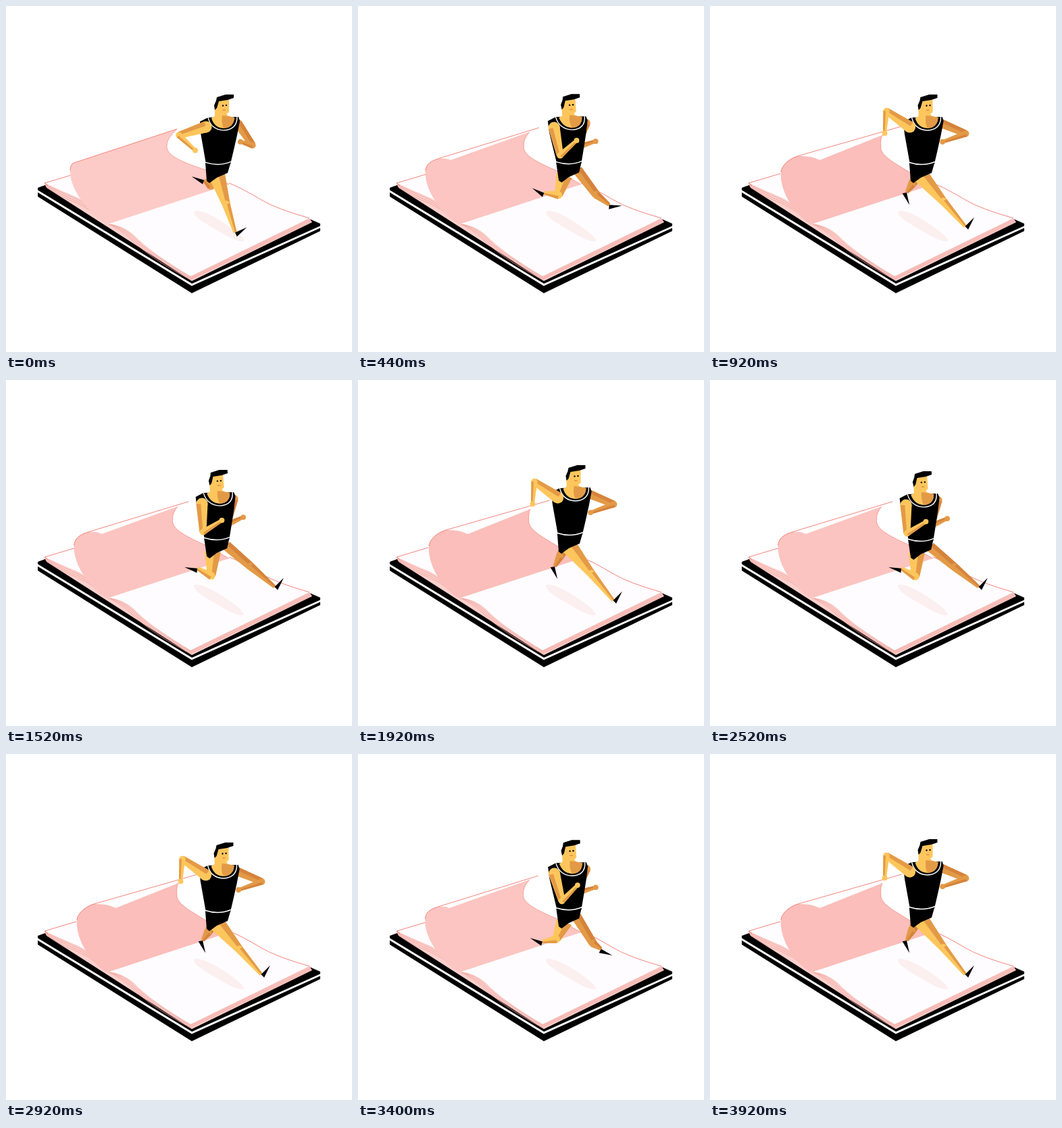
Animation of 512 by 512 pixels, one loop 3.96 s. Source, as an HTML page with a canvas:

```html
<!DOCTYPE html>
<html lang="en">
<head>
<meta charset="utf-8">
<title>Runner on a book</title>
<style>
html, body { margin: 0; width: 100%; height: 100%; overflow: hidden; background: #fff; }
canvas { display: block; width: 512px; height: 512px; }
</style>
</head>
<body>
<canvas id="stage" width="512" height="512"></canvas>
<script>
const ctx = document.getElementById('stage').getContext('2d');
const LOOP = 3960, STRIDE = 1000, TAU = Math.PI * 2;
const STANCE = .4, STRIKE = .92; // share of a stride on the ground, moment the near heel lands
const LIGHT = '#fdc65c', DARK = '#e39a47', DEEP = '#d5833c';
const PAPER = '#fefcff', PINK = '#fcd0cc', LINE = '#f0a19b', EDGE = '#f2766c';

const wrap = v => v - Math.floor(v);
const mix = (a, b, k) => a + (b - a) * k;
const mid = (a, b) => [mix(a[0], b[0], .5), mix(a[1], b[1], .5)];
const polar = ([x, y], deg, len) => {
  const a = deg * TAU / 360;
  return [x + Math.cos(a) * len, y + Math.sin(a) * len];
};

function fill(shape, color) {
  ctx.fillStyle = color;
  ctx.fill(new Path2D(shape));
}
function line(shape, color, width = 1) {
  ctx.strokeStyle = color;
  ctx.lineWidth = width;
  ctx.stroke(new Path2D(shape));
}
const poly = (pts, color) => fill('M' + pts.join('L') + 'Z', color);
function dot([x, y], r, color) {
  ctx.fillStyle = color;
  ctx.beginPath();
  ctx.arc(x, y, r, 0, TAU);
  ctx.fill();
}

function drawBook() {
  fill('M47 269L58 265L275 400L449 315L465 322V333L275 425L47 282Z', '#000');
  line('M46 273.500L275 412.500L466 326.500', '#fff', 3);
  fill('M57 262Q78 272 100 281Q128 292 150 322Q172 324 188 338Q215 366 273 400L449 314L453 320L275 407L60 269Z', PINK);
  for (let i = 0; i < 4; i++) {
    const k = i * 1.7;
    line(`M${57 + k / 3} ${262 + k}Q${79 - k} ${272 + k} ${101 - k * 2} ${281 + k}Q${128 - k} ${292 + k} 150 322` +
      `Q${172 - k} ${324 + k} ${188 - k} ${338 + k}Q${215 - k} ${366 + k} 273 ${400 + k}L${449 + k / 2} ${314 + k}`, LINE, .8);
  }
  fill('M57 262L115 244L330 263L150 323Q128 292 100 281Q78 272 57 262Z', PAPER);
  fill('M150 322L330 262Q348 269 378 287Q400 300 449 314L273 400Q215 366 188 338Q172 324 150 322Z', PAPER);
  line('M62 266L57 262L104 248M330 262Q348 269 378 287Q400 300 449 314', EDGE, .9);
  fill('M278 304C283 300 302 307 321 320C336 330 354 343 352 348C344 350 327 342 311 331C296 322 279 314 278 304Z', '#fbf0ef');
}

// The page leans back with curl 0 and rolls over its free edge with curl 1.
function drawPage(curl) {
  const at = (x, y, dx, dy) => [x + dx * curl, y + dy * curl];
  const bulge = at(95, 243, 10, 3), crest = at(110, 229, 20, -7), corner = at(113, 228, 50, 0);
  const farCrest = at(253, 182, 31, -4), farCorner = at(253, 182, 2, 9), farBulge = at(238, 207, 15, 1);
  const [bx, by] = bulge, [fx, fy] = farBulge, fold = mid(crest, corner);
  const roll = `C${bx + 1} ${by - 10} ${crest[0] - 13} ${crest[1] + 4} ${crest}`;
  const inner = `Q${fx - 1} ${fy - 10} ${farBulge}C${fx - 1} ${fy + 13} ${fx + 18} ${fy + 23} 297 ${243 + 4 * curl}L330 264`;

  fill(`M${crest}L${farCrest}L${farCorner}L${corner}Z`, '#fff');
  fill(`M150 323C128 312 ${bx - 2} ${by + 30} ${bulge}${roll}Q${fold[0] + 4} ${crest[1] - 1} ${corner}L${farCorner}${inner}Z`,
    `rgb(${253 - 2 * curl},${203 - 13 * curl},${199 - 13 * curl})`);
  line(`M${bulge}${roll}L${farCrest}`, EDGE, .9);
  line(`M${farCorner}${inner}`, EDGE, .6);
}

// Tapered limb with one side shaded.
function limb(a, b, wa, wb, base, shade, side = 1) {
  const dx = b[0] - a[0], dy = b[1] - a[1], len = Math.hypot(dx, dy) || 1;
  const nx = dy / len * side, ny = -dx / len * side;
  const off = (p, w) => [p[0] + nx * w / 2, p[1] + ny * w / 2];
  poly([off(a, wa), off(b, wb), off(b, -wb), off(a, -wa)], base);
  poly([off(a, wa), off(b, wb), off(b, 0), off(a, wa * .2)], shade);
}

// Forward reach of a limb: 1 as its heel lands, 0 as it leaves the ground.
function reach(q) {
  return q < STANCE ? (1 - q / STANCE) ** 2 : ((q - STANCE) / (1 - STANCE)) ** 2;
}

function leg(q, hip, shift, width, base, shade) {
  const r = reach(q), down = q < STANCE;
  const swing = down ? 0 : (q - STANCE) / (1 - STANCE);
  const lift = Math.sin(Math.PI * Math.sqrt(swing));
  const press = down ? Math.sin(Math.PI * r) : 0;
  const foot = [271 + 107 * r + shift, 299 + 27 * r + 21 * press - 24 * lift - shift];
  const bend = Math.sin(Math.PI * swing);
  const [mx, my] = mid(hip, foot), knee = [mx + 11 * bend, my + 27 * bend];
  const tilt = down ? mix(-45, 56, q / STANCE) : mix(56, -45, swing) + 168 * lift;
  const toe = polar(foot, tilt, 19);

  limb(hip, knee, width, 12, base, shade);
  dot(knee, 5.5, base);
  limb(knee, foot, 12, 5, base, shade);
  poly([foot, toe, polar(foot, tilt + (Math.cos(tilt * TAU / 360) < 0 ? -90 : 90), 6.5)], '#000');
}

function arm(shoulder, elbow, hand, width, base, shade, side) {
  dot(shoulder, width / 2, base);
  limb(shoulder, elbow, width, 10, base, shade, side);
  dot(elbow, 4.7, base);
  limb(elbow, hand, 9, 5, base, shade, side);
  dot(hand, 3.9, base);
}

function drawBody() {
  fill('M295 231L333 229L328 246L312 253L301 261L297 258Z', '#000');
  fill('M287 170L299 164L344 163L346 169L342 190L337 212L332 233L296 233L292 210L288 187Z', '#000');
  line('M295 230.500Q315 237 333 229.500', '#fff', 1.5);
  // neck and chest
  fill('M309 148V162L304 165Q308 179 322 180Q337 179 338 164L329 162L325 157Z', LIGHT);
  fill('M320 161L329 162L338 164Q337 179 322 180Q318 172 320 161Z', DARK);
  line('M299 164Q303 182 322 183Q342 182 342 163', '#fff', 1.4);
  // head
  fill('M312 138L330 137L330 156L325 160L313 161L310 150Z', LIGHT);
  fill('M309 153L308 146L311 139L312 134L325 130L337 130V135L328 138L315 140L312 150Z', '#000');
  dot([321, 146.5], 1.2, '#000');
  dot([326, 146], 1.2, '#000');
  line('M320.500 153H325', '#d0663a', .9);
}

function drawRunner(t, p) {
  const near = wrap(p - STRIKE), far = wrap(near + STANCE);
  const bob = 5 * Math.cos(TAU * (t - 70) / 500) - 2.5 * Math.cos(TAU * (t - 1890) / 2000);
  const lean = (1 - Math.cos(TAU * p)) / 2, swing = reach(near);
  const sway = q => Math.cos(TAU * q);

  const farShoulder = [343 - 6 * lean, 173 + bob];
  arm(farShoulder, polar(farShoulder, 115 - 93 * swing, 39), [352 - 8 * swing, 200 + bob], 13, DARK, DEEP, 1);
  leg(far, [315 + 11 * sway(far), 247 - 5 * sway(far) + bob], 20, 15, DARK, DEEP);
  leg(near, [309 + 4 * sway(near), 251 + bob], 0, 24, LIGHT, DARK);

  ctx.save();
  ctx.transform(1, 0, .074 * lean, 1, -19 * lean, bob);
  drawBody();
  ctx.restore();

  const shoulder = [296 - 6 * lean, 178 + 2 * lean + bob], angle = 72 + 143 * swing;
  const elbow = polar(shoulder, angle, 42);
  arm(shoulder, elbow, polar(elbow, angle - 120, 33), 17, LIGHT, DARK, -1);
}

function frame(now) {
  const t = now % LOOP, p = t % STRIDE / STRIDE;
  ctx.fillStyle = '#fff';
  ctx.fillRect(0, 0, 512, 512);
  drawBook();
  drawPage(p < STRIKE ? p / STRIKE : (1 - p) / (1 - STRIKE));
  drawRunner(t, p);
}

const start = performance.now();
function tick() {
  frame(performance.now() - start);
  requestAnimationFrame(tick);
}
tick();
</script>
</body>
</html>
```
